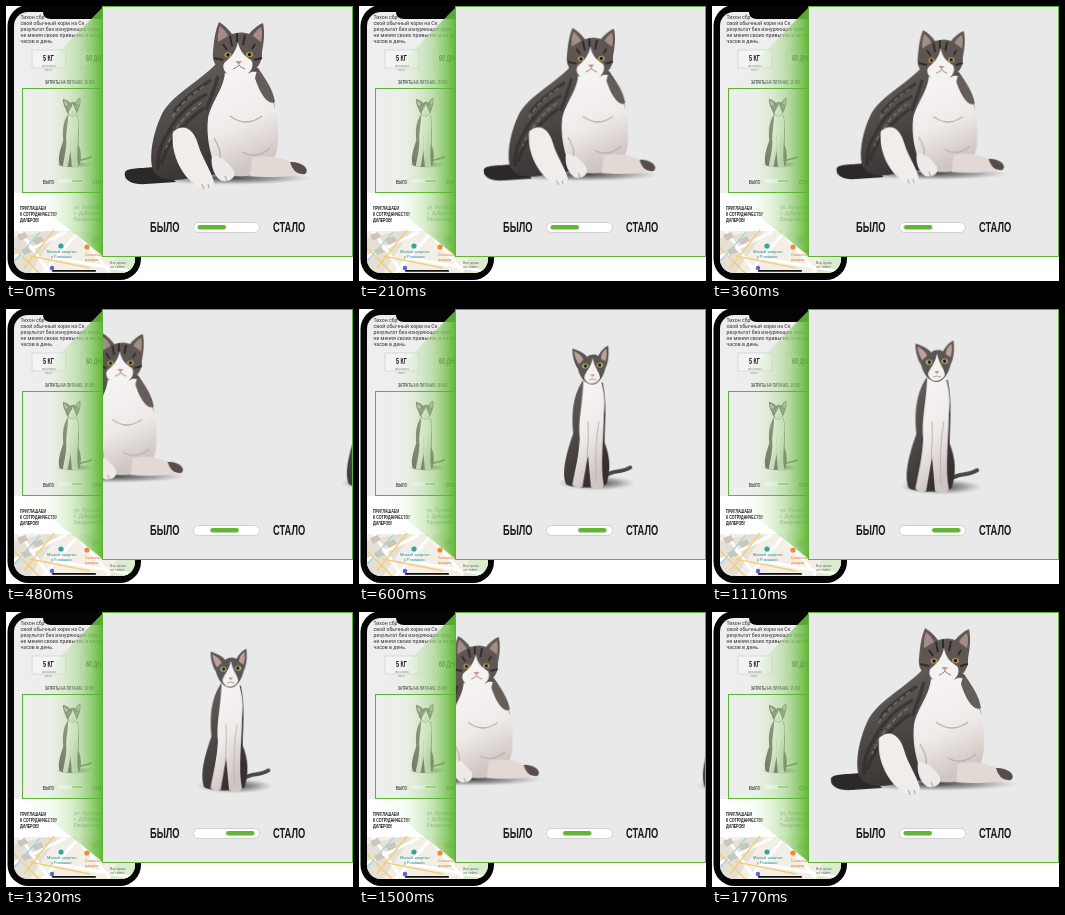
Write an HTML page that moves like this. It is 347 by 275 pixels and loops after 1.8 s.

```html
<!DOCTYPE html>
<html lang="ru">
<head>
<meta charset="utf-8">
<style>
html, body { margin: 0; width: 100%; height: 100%; overflow: hidden; background: #fff; }
svg { display: block; width: 347px; height: 275px; }
text { font-family: Roboto, "Liberation Sans", sans-serif; fill: #333; }
.cond { font-family: "Liberation Sans", Arial, sans-serif; font-weight: bold; fill: #1c1c1c; }
.line { fill: none; stroke: #5db435; }
.slide { transform-origin: 222px 116px; }
</style>
</head>
<body>
<svg viewBox="0 0 347 275">
  <defs>
    <linearGradient id="beam">
      <stop offset="0" stop-color="#e4f2dd" stop-opacity="0"/>
      <stop offset=".35" stop-color="#dcefd3" stop-opacity=".25"/>
      <stop offset=".72" stop-color="#a0d485" stop-opacity=".65"/>
      <stop offset="1" stop-color="#56b429" stop-opacity=".95"/>
    </linearGradient>
    <radialGradient id="shade">
      <stop offset="0" stop-color="#1c1c1c" stop-opacity=".85"/>
      <stop offset=".6" stop-color="#555" stop-opacity=".45"/>
      <stop offset="1" stop-color="#888" stop-opacity="0"/>
    </radialGradient>
    <linearGradient id="fur" x2=".5" y2="1">
      <stop offset="0" stop-color="#6b6562"/>
      <stop offset=".55" stop-color="#4c4744"/>
      <stop offset="1" stop-color="#35302f"/>
    </linearGradient>
    <linearGradient id="white" x2=".3" y2="1">
      <stop offset="0" stop-color="#f8f7f6"/>
      <stop offset=".6" stop-color="#efebe9"/>
      <stop offset="1" stop-color="#cfc6c3"/>
    </linearGradient>
    <clipPath id="screen"><rect x="8" y="6" width="121" height="261" rx="14"/></clipPath>
    <clipPath id="panel"><rect x="97" y="1" width="250" height="249"/></clipPath>

    <g id="slim">
      <ellipse cx="229" cy="179" rx="42" ry="8" fill="url(#shade)"/>
      <path d="M236 173C248 163 255 169 266 162" fill="none" stroke="#4b4645" stroke-width="4" stroke-linecap="round"/>
      <path d="M214 68C203 85 202 105 204 125C197 145 191 166 196 180C202 185 235 185 240 180C245 165 244 150 238 135C238 115 241 95 236 70Z" fill="url(#fur)"/>
      <path d="M215 68C214 95 209 110 211 130C210 150 206 165 203 181Q208 186 214 183L220 148L223 183C229 187 236 186 237 181C233 160 237 130 237 105C239 90 237 80 234 68Z" fill="url(#white)"/>
      <path d="M220 112Q221 130 219 152M232 112Q227 138 229 178" fill="none" stroke="#bcb3b0"/>
      <path d="M203 33C210 35 216 38 219 42C223 39 228 39 231 41C234 36 238 31 242 30C243 40 242 48 239 54C236 66 230 72 225 72C217 72 211 64 209 55C205 49 203 41 203 33Z" fill="#5b5553"/>
      <path d="M205 36Q212 39 215 45L210 50Q206 44 205 36ZM240 33Q234 37 234 44L239 47Q241 40 240 33Z" fill="#c0a09a"/>
      <path d="M225 43C227 54 233 59 233 65C229 73 219 73 216 65C216 59 223 55 225 43Z" fill="#f4f1ef"/>
      <g fill="#a6b46a"><ellipse cx="217" cy="52" rx="3.4" ry="2.8"/><ellipse cx="233" cy="51" rx="3.4" ry="2.8"/></g>
      <g fill="#171717"><circle cx="217.3" cy="52" r="1.7"/><circle cx="232.7" cy="51" r="1.7"/></g>
      <path d="M222.500 61h5l-2.500 3Z" fill="#c98f89"/>
      <path d="M221 67Q225 65 229 67" fill="none" stroke="#9b8f8c" stroke-width=".8"/>
    </g>

    <g id="stout">
      <ellipse cx="222" cy="172" rx="84" ry="7" fill="url(#shade)"/>
      <path d="M154 160C138 163 122 161 119 166C117 174 126 179 140 178L170 176Z" fill="#2b2827"/>
      <path d="M210 58C190 78 164 90 155 110C146 130 143 152 147 164C154 176 172 176 190 170L245 166C266 150 272 130 269 105C268 88 262 76 252 62Z" fill="url(#fur)"/>
      <path d="M205 74C190 84 176 94 168 106M201 88C184 96 170 112 162 126M198 102C178 116 162 136 155 158M166 122C156 134 151 148 152 163M212 70Q207 88 200 104" fill="none" stroke="#2c2827" stroke-width="3.500" opacity=".6"/>
      <path d="M198 80C186 88 174 98 166 112M196 96C182 106 168 122 160 142" fill="none" stroke="#8b8380" stroke-width="1.500" opacity=".7" stroke-dasharray="5 3"/>
      <path d="M219 64C219 82 206 94 202 112C200 130 204 146 208 158C216 170 232 172 246 169C264 166 273 152 272 128C273 108 266 88 253 66Z" fill="url(#white)"/>
      <path d="M251 64C260 72 267 84 269 96C262 100 254 88 249 72Z" fill="#655d5a"/>
      <path d="M246 152C262 148 276 152 286 157C298 158 302 163 299 167C284 171 262 172 244 170Z" fill="#e2d9d5"/>
      <path d="M284 156C298 156 304 164 299 168Q288 170 284 156Z" fill="#574d4a"/>
      <path d="M206 150C214 148 222 156 228 165C230 172 224 176 216 175C209 172 204 160 206 150Z" fill="#eeeae8"/>
      <path d="M167 126C178 116 188 124 192 138C196 152 205 164 208 176C207 184 196 184 190 179C178 172 164 150 167 126Z" fill="#f0edeb"/>
      <path d="M196 178L198 183M202 178L203 182M219 170L221 175M224 110Q240 122 256 110M208 132Q216 146 214 152M236 146Q250 154 264 142" fill="none" stroke="#b9afac" stroke-width="1.300"/>
      <path d="M213 16C218 19 223 24 226 28C232 26 238 26 243 28C247 23 252 19 257 17C259 26 258 36 256 46C257 60 246 69 232 70C217 69 205 60 207 46C208 35 209 25 213 16Z" fill="#5d5653"/>
      <path d="M214 20Q220 25 222 30L212 36Q211 28 214 20ZM255 21Q249 25 247 30L255 36Q257 28 255 21Z" fill="#a38d86"/>
      <path d="M224 30L226 40M231 27V36M239 29L237 39M208 52L217 54M256 52L248 54M217 38L221 44M249 38L246 43" stroke="#2e2a29" stroke-width="2"/>
      <path d="M232 36C234 45 237 49 245 54C250 61 242 71 232 72C221 71 214 62 219 56C227 50 230 44 232 36Z" fill="#f5f3f1"/>
      <g fill="#b8975a"><ellipse cx="222" cy="49" rx="3.500" ry="2.700"/><ellipse cx="243.500" cy="48.500" rx="3.500" ry="2.700"/></g>
      <g fill="#171717"><circle cx="222" cy="49" r="1.700"/><circle cx="243.500" cy="48.500" r="1.700"/></g>
      <path d="M229.500 55h6.500l-3.200 4Z" fill="#cf8f88"/>
      <path d="M227 63Q232 61 233 59Q234 61 239 63" fill="none" stroke="#8c817e"/>
    </g>
  </defs>

  <rect x="1.500" y="-1" width="133.500" height="275" rx="21" fill="#050505"/>
  <g clip-path="url(#screen)">
    <rect x="8" y="6" width="121" height="181" fill="#eee"/>
    <rect x="8" y="187" width="121" height="38" fill="#fff"/>
    <g id="copy"></g>
    <g fill="#f4f4f4" stroke="#d2d2d2" stroke-width=".8">
      <rect x="26" y="44" width="34" height="18"/><rect x="75" y="44" width="34" height="18"/>
    </g>
    <use href="#slim" transform="translate(-34.500 78) scale(.45)"/>
    <rect x="53" y="173" width="26" height="4" rx="2" fill="#fff"/>
    <rect x="66" y="174.200" width="11" height="1.600" rx=".8" fill="#62b537"/>
    <g>
      <rect x="8" y="225" width="121" height="42" fill="#f3efe6"/>
      <path d="M104 267L112 246L129 240V267Z" fill="#dcebcf"/>
      <path d="M8 232L40 225H52L24 267H8Z" fill="#e4e0d6"/>
      <path d="M6 252L60 226M12 222L44 268M36 268L76 222M50 252L130 266M70 226L104 266" stroke="#fff" stroke-width="3"/>
      <path d="M6 240L34 268M24 250L84 262M18 262L48 224" stroke="#f3cf7c" stroke-width="1.500"/>
      <path d="M6 258L34 226" stroke="#a9d4e8" stroke-width="1.500"/>
      <path d="M11 229l8-3 3 5-8 4ZM26 234l9-4 3 5-8 4ZM15 244l7-3 4 5-8 3ZM84 232l8-3 2 6-7 3Z" fill="#cbc6bb"/>
      <circle cx="55" cy="240" r="2.600" fill="#2ea6a6"/>
      <circle cx="81" cy="241" r="2.600" fill="#f08a35"/>
      <circle cx="46" cy="262" r="2.200" fill="#5a62d6"/>
    </g>
    <g id="labels"></g>
    <rect x="46" y="264" width="44" height="1.800" rx=".9" fill="#111"/>
  </g>
  <path d="M33 0H103V5Q102 13 94 13H45Q37 13 37 6Q36 4 33 4Z" fill="#050505"/>

  <path d="M17 82L97 1V250L17 187Z" fill="url(#beam)"/>
  <rect class="line" x="16.500" y="82.500" width="81" height="104"/>

  <rect x="97" y="0" width="250" height="251" fill="#e9e9e9"/>
  <g clip-path="url(#panel)">
    <g id="track">
      <g class="slide"><use href="#stout"/></g>
      <g transform="translate(262)"><g class="slide"><use href="#slim"/></g></g>
    </g>
  </g>
  <rect x="187.500" y="216.500" width="66" height="10" rx="5" fill="#fff" stroke="#d0d0d0"/>
  <rect id="knob" x="191.500" y="219" width="28.500" height="4.500" rx="2.250" fill="#62b537"/>
  <g id="captions"></g>
  <rect class="line" x="96.500" y=".5" width="250" height="250"/>
</svg>
<script>
const byId = id => document.getElementById(id);

function write(group, str, x, y, size, fill) {
  const el = document.createElementNS("http://www.w3.org/2000/svg", "text");
  el.textContent = str;
  el.setAttribute("transform", `translate(${x} ${y})`);
  el.style.fontSize = size + "px";
  if (fill) el.style.fill = fill;
  byId(group).append(el);
  return el;
}

// Narrow poster lettering
function headline(group, str, x, y, size) {
  const el = write(group, str, x, y, size);
  el.classList.add("cond");
  el.setAttribute("transform", `translate(${x} ${y}) scale(.6 1)`);
}

["Тихон сбр", "свой обычный корм на Ск", "результат без изнуряющих трен",
 "не меняя своих привычек и не прово", "часов в день."]
  .forEach((s, i) => write("copy", s, 14.5, 13 + i * 5.9, 5.2));

headline("labels", "5 КГ", 37, 54.5, 9);
headline("labels", "60 ДНЕЙ", 80, 54.5, 9);
["экономия", "веса"].forEach((s, i) => write("labels", s, 36 + i * 3, 61 + i * 4, 3, "#777"));
headline("labels", "ЗАТРАТЫ НА ПИТАНИЕ: 15 000", 39, 78, 5.4);
headline("labels", "БЫЛО", 37, 177.5, 6);
headline("labels", "СТАЛО", 87, 177.5, 6);
["ПРИГЛАШАЕМ", "К СОТРУДНИЧЕСТВУ", "ДИЛЕРОВ!"]
  .forEach((s, i) => headline("labels", s, 14, 204 + i * 5.8, 6));
["ул. Луговая", "г. Дубравск", "Ежедневно"]
  .forEach((s, i) => write("labels", s, 68, 203 + i * 5.8, 5, "#888"));
["Малый квартал", "у Ромашки"]
  .forEach((s, i) => write("labels", s, 41 + i * 4, 247 + i * 4.5, 4, "#2a8f9a"));
["Сказочный", "дворик"].forEach((s, i) => write("labels", s, 79, 250 + i * 4.5, 4, "#e07a28"));
["Все цены", "на сайте"].forEach((s, i) => write("labels", s, 104, 258 + i * 4, 3.6, "#666"));

headline("captions", "БЫЛО", 144, 226, 15.5);
headline("captions", "СТАЛО", 267, 226, 15.5);

// Each swap: the cats shrink, slide across, then grow back
const LOOP = 1800, SMALL = .92;

function loop(el, steps, toTransform) {
  el.animate(steps.map(([t, v]) =>
    ({ offset: t / LOOP, transform: toTransform(v), easing: "ease-in-out" })),
    { duration: LOOP, iterations: Infinity });
}

function shuttle(id, dx) {
  loop(byId(id), [[0, 0], [340, 0], [640, dx], [1340, dx], [1640, 0], [LOOP, 0]],
    x => `translateX(${x}px)`);
}

shuttle("track", -262);
shuttle("knob", 28.5);
document.querySelectorAll(".slide").forEach(el => loop(el,
  [[0, 1], [330, SMALL], [580, SMALL], [790, 1], [1000, 1], [1330, SMALL], [1580, SMALL], [1790, 1], [LOOP, 1]],
  s => `scale(${s})`));
</script>
</body>
</html>
```
